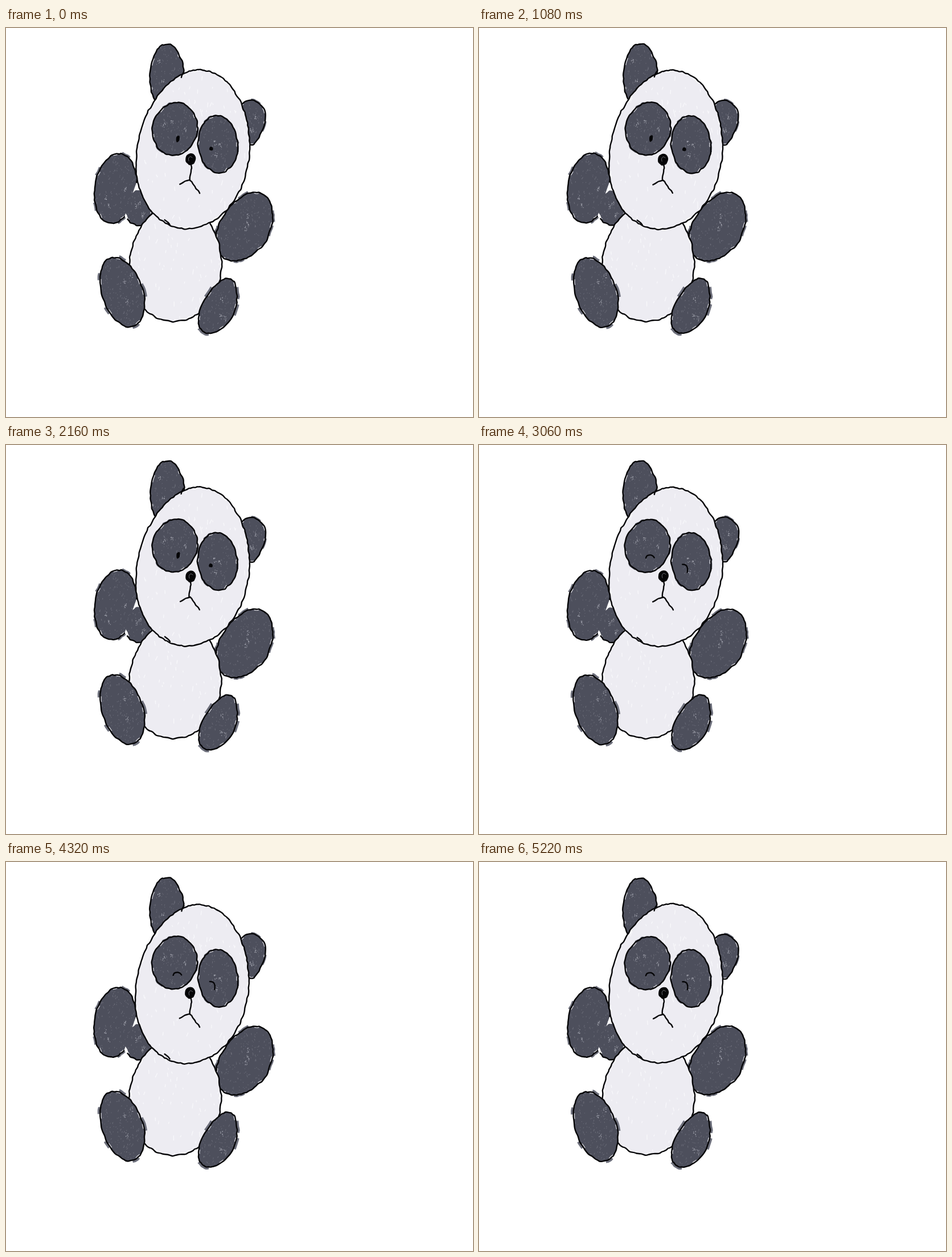
Recreate the animation shown at these times as an HTML page with a canvas. Size 820x683 px, loop 5400 ms.

```html
<!DOCTYPE html>
<html lang="en">
<head>
<meta charset="utf-8">
<title>Crayon panda</title>
<style>
  html, body { margin: 0; width: 100%; height: 100%; overflow: hidden; background: #fff; }
  canvas { display: block; width: 820px; height: 683px; }
</style>
</head>
<body>
<canvas id="stage" width="820" height="683"></canvas>
<script>
const ctx = document.getElementById('stage').getContext('2d');
const LOOP = 5400, STEP = 180, BLINK = 2700;
const DARK = '#4d4f5c', PALE = '#edecf2', INK = '#050507';

// Seeded random numbers in 0..1
function seeded(seed) {
  let s = seed * 2654435761 >>> 0;
  return () => {
    s = s + 0x6d2b79f5 >>> 0;
    let t = Math.imul(s ^ s >>> 15, s | 1);
    t ^= t + Math.imul(t ^ t >>> 7, t | 61);
    return ((t ^ t >>> 14) >>> 0) / 4294967296;
  };
}

// Shaky line: at(u) gives the place for u in 0..1
function handLine(at, length, closed, wobble, rnd) {
  const n = Math.max(3, Math.round(length / 4.5)), pts = [];
  for (let i = 0; i < (closed ? n : n + 1); i++)
    pts.push(at(i / n).map(v => v + (rnd() - 0.5) * 2 * wobble));

  const path = new Path2D(), last = pts.length - 1;
  const mid = (p, q) => [(p[0] + q[0]) / 2, (p[1] + q[1]) / 2];
  path.moveTo(...(closed ? mid(pts[last], pts[0]) : pts[0]));
  for (let i = 0; i < (closed ? n : last); i++)
    path.quadraticCurveTo(...pts[i], ...mid(pts[i], pts[(i + 1) % pts.length]));
  if (closed) path.closePath(); else path.lineTo(...pts[last]);
  return path;
}

// Egg-shaped arc: lean moves the bottom sideways, egg makes the bottom fuller
function ovalLine({ x, y, rx, ry, lean = 0, egg = 0, from = 0, to = 360, wobble = 1.3 }, rnd) {
  const at = u => {
    const a = (from + (to - from) * u) * Math.PI / 180, s = Math.sin(a);
    return [x + rx * Math.cos(a) * (1 + egg * s) + lean * s, y + ry * s];
  };
  const length = Math.PI * (rx + ry) * (to - from) / 360;
  return handLine(at, length, to - from === 360, wobble, rnd);
}

// Short marks where the crayon skipped the paper
function grains({ x, y, rx, ry }, dark, rnd) {
  const path = new Path2D();
  for (let i = 0; i < rx * ry / (dark ? 12 : 110); i++) {
    const px = x + (rnd() * 2 - 1) * rx, py = y + (rnd() * 2 - 1) * ry;
    const len = dark ? 0.5 + 3 * rnd() ** 4 : 2 + 7 * rnd() ** 2;
    const a = 1.2 + rnd() * 0.9;
    path.moveTo(px, py);
    path.lineTo(px + Math.cos(a) * len, py + Math.sin(a) * len);
  }
  return path;
}

// A few patches of brighter specks near the middle
function shine({ x, y, rx, ry }, rnd) {
  const path = new Path2D();
  for (let k = 0; k < 3; k++) {
    const px = x + (rnd() - 0.5) * rx, py = y + (rnd() - 0.5) * ry;
    for (let i = 0; i < 9; i++)
      path.rect(px + (rnd() - 0.5) * 5, py + (rnd() - 0.5) * 9, 1, 1.2);
  }
  return path;
}

let count = 0;
function oval(shape, fill = DARK, fringe = 0) {
  const id = ++count, rnd = seeded(id), dark = fill === DARK;
  return {
    id, fill, fringe, dark,
    path: ovalLine(shape, rnd),
    grain: grains(shape, dark, rnd),
    shine: shine(shape, rnd),
    gap: [4 + rnd() * 5, 35 + rnd() * 20, 8 + rnd() * 6, 50 + rnd() * 30],
    spill: [10 + rnd() * 12, 45 + rnd() * 30]
  };
}

function arc(shape) {
  const id = ++count;
  return { id, path: ovalLine({ wobble: 0.5, ...shape }, seeded(id)) };
}

function line(x1, y1, x2, y2) {
  const id = ++count;
  const at = u => [x1 + (x2 - x1) * u, y1 + (y2 - y1) * u];
  return { id, path: handLine(at, Math.hypot(x2 - x1, y2 - y1), false, 1.2, seeded(id)) };
}

const ears = [
  oval({ x: 283, y: 85, rx: 30, ry: 58 }),
  oval({ x: 430, y: 166, rx: 24, ry: 39, egg: -0.3 }, DARK, 5)
];
const arms = [
  oval({ x: 192, y: 281, rx: 37, ry: 61, lean: -6, from: 55, to: 350 }, DARK, 7),
  oval({ x: 232, y: 315, rx: 25, ry: 31, from: 15, to: 140 }),
  oval({ x: 420, y: 348, rx: 47, ry: 60, lean: -18, egg: 0.08 }, DARK, 7)
];
// Fills the shoulder between the paw and the head
const shoulder = oval({ x: 232, y: 314, rx: 23, ry: 29 });
const body = oval({ x: 297, y: 410, rx: 81, ry: 104, lean: -3, egg: 0.08 }, PALE);
const legs = [
  oval({ x: 204.5, y: 464, rx: 37, ry: 61, lean: 14 }, DARK, 9),
  oval({ x: 374, y: 487, rx: 30, ry: 48, lean: -16, egg: 0.15 }, DARK, 9)
];
const head = oval({ x: 328, y: 213.5, rx: 99, ry: 139.5, lean: -11, egg: 0.06 }, PALE);
const patches = [
  oval({ x: 296.5, y: 177, rx: 39.5, ry: 46, lean: -3 }, DARK, 4),
  oval({ x: 372, y: 203.5, rx: 35, ry: 50.5, lean: 2 }, DARK, 4)
];

const nose = oval({ x: 324, y: 230, rx: 9, ry: 10.5, wobble: 1 }, INK);
const noseMark = arc({ x: 324, y: 230, rx: 4, ry: 5, from: 130, to: 330 });
const pupils = [
  oval({ x: 302.5, y: 194, rx: 4, ry: 6, lean: -2 }, INK),
  oval({ x: 359.5, y: 212, rx: 4, ry: 4.5 }, INK)
];
const lids = [
  arc({ x: 300.5, y: 198, rx: 7, ry: 5, from: 170, to: 360 }),
  arc({ x: 359, y: 219, rx: 7.5, ry: 10, from: -105, to: 25 })
];
const marks = [
  line(311, 77, 308, 87), line(279, 337, 287, 346),
  line(325, 240, 323, 266), line(305, 274, 323, 266), line(323, 266, 340, 289)
];

// Each part sits a little off on every step
function placed(item, step, draw) {
  const rnd = seeded(item.id * 97 + step * 1013);
  ctx.save();
  ctx.translate((rnd() - 0.5) * 1.5, (rnd() - 0.5) * 1.5 + 0.3);
  draw(item);
  ctx.restore();
}

function ink(path, width = 2.4, color = INK, dash = []) {
  ctx.strokeStyle = color;
  ctx.lineWidth = width;
  ctx.lineCap = dash.length ? 'butt' : 'round';
  ctx.setLineDash(dash);
  ctx.stroke(path);
}

function drawFill(p) {
  if (p.fringe) ink(p.path, p.fringe, '#6d6f7b', p.spill);
  ctx.fillStyle = p.fill;
  ctx.fill(p.path);
  ctx.save();
  ctx.clip(p.path);
  ink(p.grain, p.dark ? 0.7 : 1.3, p.dark ? '#777985' : '#f8f8fb');
  if (p.dark) {
    ctx.fillStyle = '#a9abb5';
    ctx.fill(p.shine);
  }
  ink(p.path, p.dark ? 5 : 7, p.dark ? '#d3d3da' : '#fbfbfd', p.gap);
  ctx.restore();
}

function drawPart(p) {
  drawFill(p);
  ink(p.path);
}

function drawBlot(p) {
  ctx.fillStyle = INK;
  ctx.fill(p.path);
}

const drawLine = s => ink(s.path);

function draw(step) {
  const all = (items, how) => items.forEach(item => placed(item, step, how));
  ctx.fillStyle = '#fff';
  ctx.fillRect(0, 0, 820, 683);
  ctx.lineJoin = 'round';
  placed(shoulder, step, drawFill);
  all([...ears, ...arms, body, ...legs, head, ...patches], drawPart);
  all(marks, drawLine);
  placed(nose, step, drawBlot);
  placed(noseMark, step, s => ink(s.path, 0.9, '#77777d'));
  if (step * STEP < BLINK) all(pupils, drawBlot);
  else all(lids, drawLine);
}

let shown = -1;
function tick() {
  const step = Math.floor(performance.now() % LOOP / STEP);
  if (step !== shown) draw(shown = step);
  requestAnimationFrame(tick);
}
tick();
</script>
</body>
</html>
```
